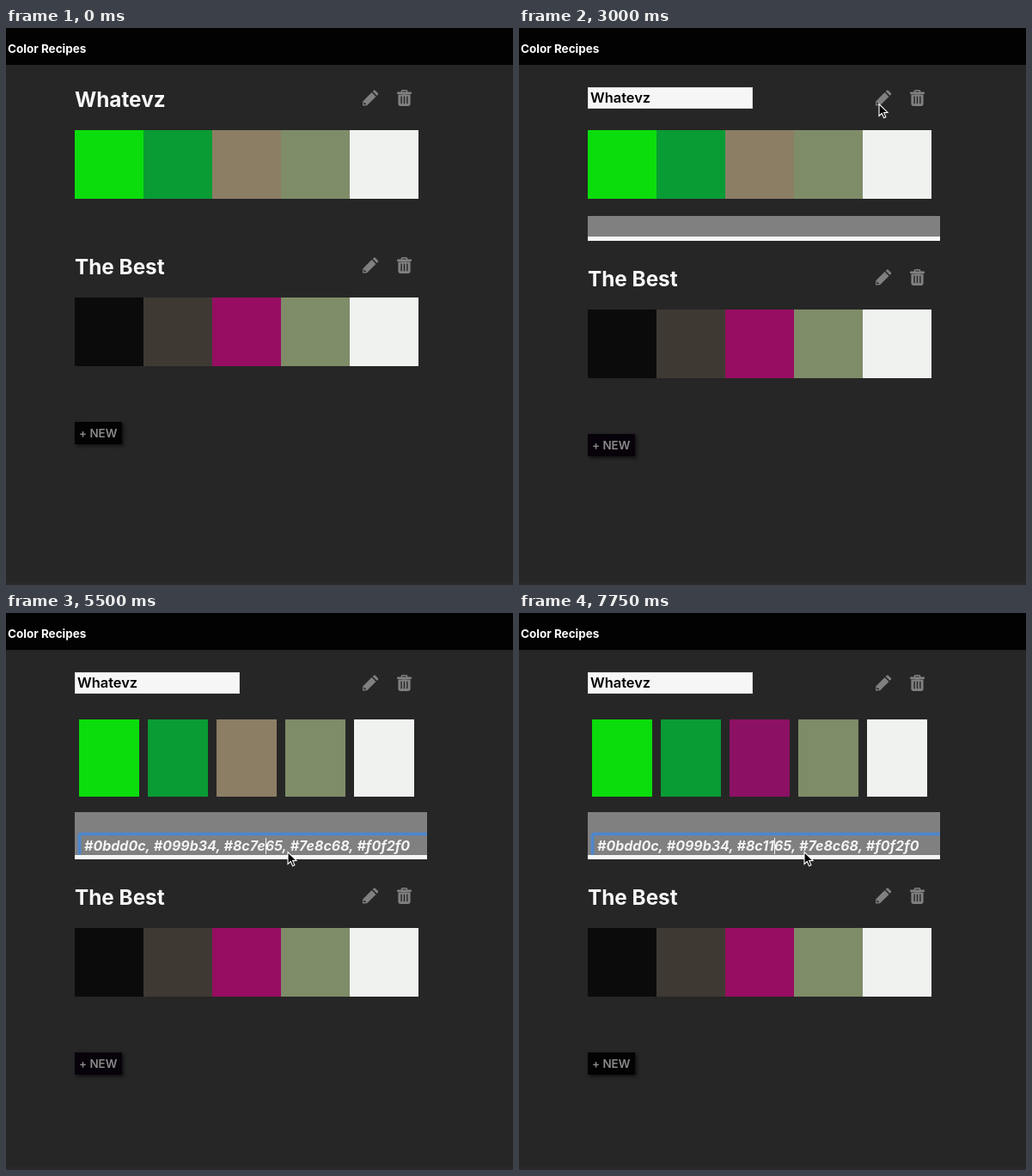
Write an HTML page with a canvas that moves like this. It is 590x649 px and loops after 8000 ms.

```html
<!DOCTYPE html>
<html lang="en">
<head>
<meta charset="utf-8">
<title>Color Recipes</title>
<style>
html, body { margin: 0; width: 100%; height: 100%; overflow: hidden; background: #262626; }
canvas { display: block; }
</style>
</head>
<body>
<canvas id="stage" width="590" height="649"></canvas>
<script>
const ctx = document.getElementById('stage').getContext('2d');
const LOOP = 8000, STEP = 250;
const FONT = 'Inter, "Open Sans", sans-serif';
const BG = '#262626', GRAY = '#808080', LIGHT = '#f0f2f0', WHITE = '#f6f6f6';
const TOP = ['#0bdd0c', '#099b34', '#8c7e65', '#7e8c68', LIGHT];
const BOTTOM = ['#0a0b0a', '#3e3a33', '#970d61', '#7e8c68', LIGHT];

const smooth = u => u * u * (3 - 2 * u);
const easeOut = u => 1 - (1 - u) ** 3;
const clamp = (v, lo, hi) => Math.min(hi, Math.max(lo, v));

// Pointer sweeps: each runs along a quadratic curve from a, bent by b, to c
const SWEEPS = [
  { from: 500, to: 1250, ease: smooth, a: [456, 67], b: [437, 101], c: [424, 89] },
  { from: 2250, to: 2500, ease: easeOut, a: [424, 89], b: [421, 88], c: [418, 87] },
  { from: 3750, to: 5000, ease: smooth, a: [418, 87], b: [322, 100], c: [301, 277] },
  { from: 5250, to: 5750, ease: easeOut, a: [301, 277], b: [316, 277], c: [331, 277] }
];

function rect(color, x, y, w, h) {
  ctx.fillStyle = color;
  ctx.fillRect(x, y, w, h);
}

function text(str, x, y, size, color, weight = 700, style = 'normal') {
  ctx.font = `${style} ${weight} ${size}px ${FONT}`;
  ctx.fillStyle = color;
  ctx.fillText(str, x, y);
  return x + ctx.measureText(str).width;
}

function poly(...points) {
  ctx.beginPath();
  points.forEach(([x, y]) => ctx.lineTo(x, y));
  ctx.closePath();
  ctx.fill();
}

function round(x, y, w, h, r) {
  ctx.beginPath();
  ctx.roundRect(x, y, w, h, r);
}

function at(x, y, paint) {
  ctx.save();
  ctx.translate(x, y);
  paint();
  ctx.restore();
}

function pencil() {
  ctx.fillStyle = GRAY;
  poly([0, 18.5], [0.2, 13.4], [10.6, 3], [15.5, 7.9], [5.1, 18.3]);
  poly([11.7, 1.9], [13.2, 0.5], [14.4, 0.5], [18, 4.1], [18, 5.3], [16.6, 6.8]);
  rect(BG, 1.4, 14.6, 1, 2.4);
  rect(BG, 1.4, 16, 2.6, 1);
}

function trash() {
  ctx.strokeStyle = ctx.fillStyle = GRAY;
  ctx.lineWidth = 1.6;
  round(5.4, 0.8, 6.2, 4, 1);
  ctx.stroke();
  round(0, 2.4, 17, 2.6, 0.8);
  ctx.fill();
  round(1.4, 5.4, 14.2, 13.6, [0, 0, 2.4, 2.4]);
  ctx.fill();
  for (let i = 0; i < 3; i++) rect(BG, 4.4 + i * 3.4, 7.6, 1.4, 8.6);
}

function icons(y) {
  at(415, y, pencil);
  at(455, y, trash);
}

// Five swatches share 400 px; open(i) grows the margin round each one
function swatches(colors, y, open = () => 0) {
  const margins = colors.map((c, i) => 5 * open(i));
  const mean = margins.reduce((a, b) => a + b) / 5;
  let x = 80;
  colors.forEach((c, i) => {
    const m = margins[i];
    const w = 80 - 2 * mean + 1.5 * (m - mean);
    const left = Math.round(x + m), right = Math.round(x + m + w);
    rect(c, left, Math.round(y + m), right - left, Math.round(80 + 2 * m));
    x += w + 2 * m;
  });
}

function topSwatches(t) {
  const colors = [...TOP];
  if (t >= 7000) colors[2] = t < 7750 ? 'transparent' : '#8c1165';
  const open = t < 3250 ? () => 0 : t < 3500 ? i => 1 - (i / 4) ** 2 : () => 1;
  swatches(colors, 119, open);
}

function nameField() {
  rect('#dcdcdc', 80, 69, 192, 25);
  rect(WHITE, 81, 70, 190, 23);
  text('Whatevz', 83, 87, 16.4, '#000', 600);
}

function focusRing() {
  ctx.save();
  ctx.beginPath();
  ctx.rect(80, 232, 410, 50);
  ctx.clip();
  round(85.5, 257.5, 420, 40, 2);
  for (const [width, alpha] of [[5, 0.35], [3, 0.85]]) {
    ctx.lineWidth = width;
    ctx.strokeStyle = `rgba(74,136,212,${alpha})`;
    ctx.stroke();
  }
  ctx.restore();
}

function hexField(t) {
  const focused = t >= 5500;
  const count = clamp(Math.floor((t - 7250) / STEP), 0, 2);
  const typed = t < 7000 ? '7e' : '11'.slice(0, count);
  const hex = (str, x) => text(str, x, 277, 16, '#f4f4f4', 700, 'italic');

  if (focused) focusRing();
  const caret = hex('#0bdd0c, #099b34, #8c' + typed, 91);
  hex('65, #7e8c68, #f0f2f0', caret);
  const blinkOff = t >= 6000 && t < 6500;
  if (focused && !blinkOff) rect('#f4f4f4', Math.round(caret), 262, 1, 19);
}

function panel(t) {
  const open = t >= 3250;
  const y = open ? 232 : 219, h = open ? 50 : 24;
  rect(GRAY, 80, y, 410, h);
  rect(WHITE, 80, y + h, 410, 5);
  if (open) hexField(t);
}

function newButton(y, tinted) {
  ctx.save();
  ctx.shadowColor = 'rgba(0,0,0,.6)';
  ctx.shadowBlur = 4;
  ctx.shadowOffsetX = ctx.shadowOffsetY = 2;
  rect(tinted ? '#08020a' : '#030303', 80, y, 55, 26);
  ctx.restore();
  text('+ NEW', 85, y + 18, 13.4, '#8a8a8a', 600);
}

function arrow() {
  ctx.fillStyle = '#000';
  ctx.strokeStyle = '#fff';
  ctx.lineWidth = 1.1;
  poly([0, 0], [0, 14], [3.3, 11], [5.6, 16.3], [7.9, 15.3], [5.7, 10.1], [10, 9.9]);
  ctx.stroke();
}

function pointer(t) {
  const now = Math.floor(t / STEP) * STEP;
  const sweep = SWEEPS.filter(s => s.from <= now).pop();
  if (!sweep) return;
  const { from, to, ease, a, b, c } = sweep;
  const u = ease(clamp((now - from) / (to - from), 0, 1)), v = 1 - u;
  const [x, y] = [0, 1].map(k => Math.round(v * v * a[k] + 2 * u * v * b[k] + u * u * c[k]));
  at(x + 1, y + 1.5, arrow);
}

function draw(t) {
  const editing = t >= 3000;
  const shift = t < 3000 ? 0 : t < 3250 ? 14 : 53;

  rect(BG, 0, 0, 590, 649);
  rect('#020202', 0, 0, 590, 43);
  rect('#2a282a', 0, 645, 590, 4);
  text('Color Recipes', 2, 29, 13.5, '#fff');

  if (editing) nameField();
  else text('Whatevz', 80, 92, 24.3, '#f8f8f8');
  icons(72);
  topSwatches(t);
  if (editing) panel(t);

  text('The Best', 80, 287 + shift, 24.3, '#f8f8f8');
  icons(267 + shift);
  swatches(BOTTOM, 314 + shift);
  newButton(459 + shift, editing && t < 7500);
  pointer(t);
}

const start = performance.now();
function tick(now) {
  draw(Math.max(0, now - start) % LOOP);
  requestAnimationFrame(tick);
}
draw(0);
requestAnimationFrame(tick);
</script>
</body>
</html>
```
